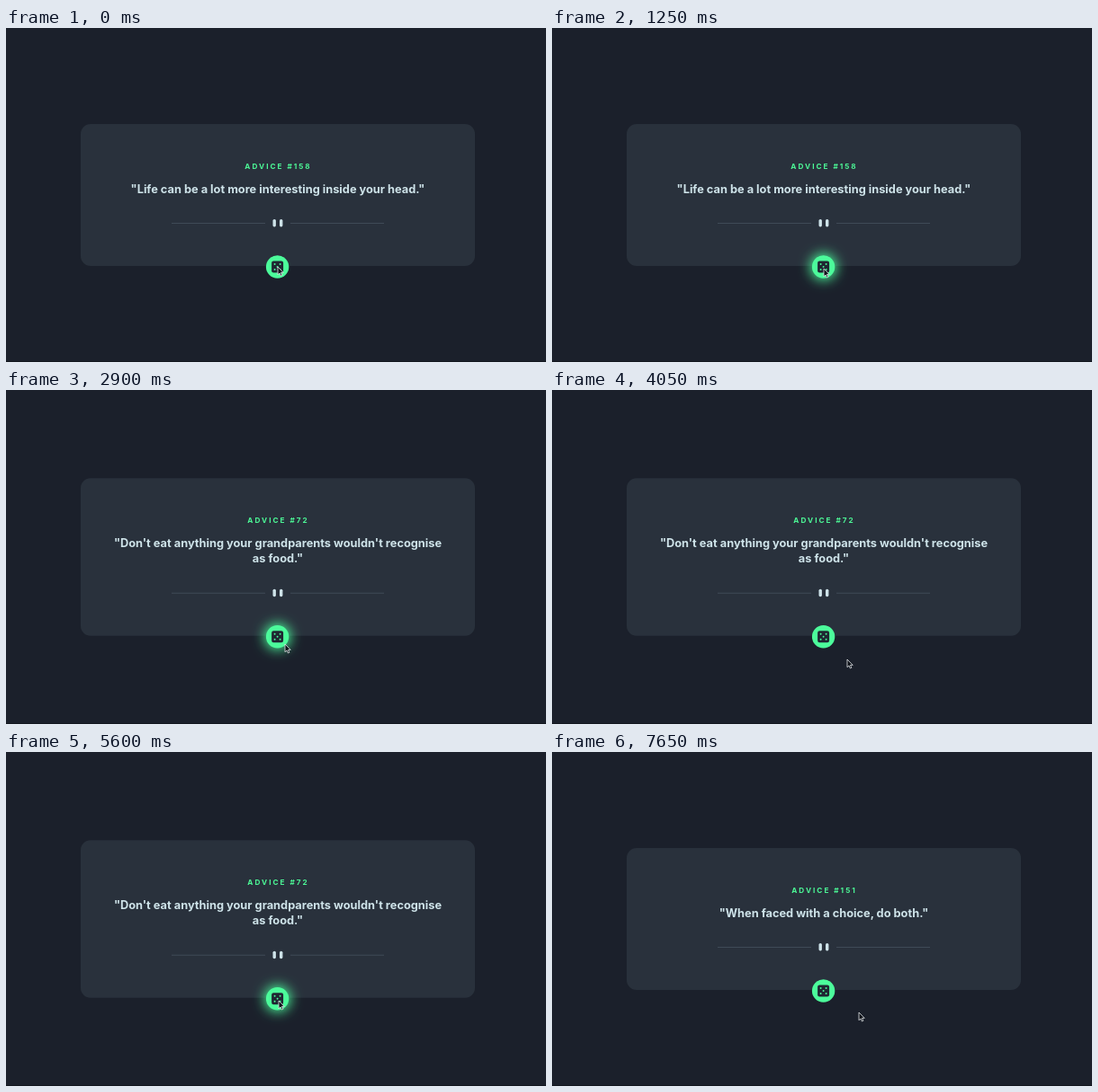
An HTML page for the animation above (8 s loop, 600 by 372 pixels).

```html
<!DOCTYPE html>
<html lang="en">
<head>
<meta charset="utf-8">
<title>Advice card</title>
<style>
  html, body { margin: 0; width: 100%; height: 100%; overflow: hidden; background: #1b202b; }
  svg { display: block; width: 600px; height: 372px; }
  text { font-family: Inter, "Open Sans", sans-serif; font-weight: 700; text-anchor: middle; }
  #heading { font-size: 8.2px; letter-spacing: 2px; fill: #4cf896; }
  .quote { font-size: 12.8px; fill: #cee3e9; }
  .green { fill: #4cfb9b; }
</style>
</head>
<body>
<svg viewBox="0 0 600 372">
  <defs>
    <filter id="blur" x="-150%" y="-150%" width="400%" height="400%">
      <feGaussianBlur stdDeviation="7"/>
    </filter>
  </defs>
  <rect width="600" height="372" fill="#1b202b"/>
  <rect y="371" width="600" height="1" fill="#12161e"/>
  <rect id="card" x="83" width="438" rx="11" fill="#29313c"/>
  <text id="heading" x="302.5"/>
  <text class="quote" x="302"/>
  <text class="quote" x="302"/>
  <g id="footer">
    <path d="M184 -47.5H288M316 -47.5H420" stroke="#3f4a57"/>
    <g fill="#cee3e9">
      <rect x="296.5" y="-52" width="3.4" height="8.4" rx="1.6"/>
      <rect x="304" y="-52" width="3.4" height="8.4" rx="1.6"/>
    </g>
    <g transform="translate(301.6 1)">
      <circle id="glow" class="green" r="14.5" filter="url(#blur)"/>
      <circle class="green" r="12.7"/>
      <rect x="-6.5" y="-6.5" width="13" height="13" rx="2.2" fill="#1f2632"/>
      <g class="green">
        <circle r=".95"/>
        <circle cx="-3" cy="-3" r=".95"/>
        <circle cx="3" cy="-3" r=".95"/>
        <circle cx="-3" cy="3" r=".95"/>
        <circle cx="3" cy="3" r=".95"/>
      </g>
    </g>
  </g>
  <path id="cursor" d="M0 0V8.8L2 7 3.3 10 4.8 9.4 3.5 6.4H6.2Z" fill="#10131a" stroke="#e4e8ea" stroke-width=".8" stroke-linejoin="round"/>
</svg>
<script>
const LOOP = 8000, LINE = 17.5, CENTER = 186;
const $ = id => document.getElementById(id);
const quoteLines = document.querySelectorAll('.quote');

const slides = [
  { from: 0, number: 158, lines: ['"Life can be a lot more interesting inside your head."'] },
  { from: 2350, number: 72, lines: ['"Don\'t eat anything your grandparents wouldn\'t recognise', 'as food."'] },
  { from: 5750, number: 151, lines: ['"When faced with a choice, do both."'] }
];

// Pointer stops: time, x, y
const stops = [
  [0, 302, 266], [400, 302, 267], [700, 312.5, 276], [900, 313, 276.5],
  [1250, 302, 268], [2700, 302, 268], [2900, 310, 283], [3350, 344, 307.5],
  [3850, 344, 307.5], [4050, 328, 300], [4650, 303, 277], [6500, 303, 277],
  [6650, 306, 277], [7350, 306, 277], [7650, 341, 290], [LOOP, 341, 290]
];

const hovers = [[50, 500], [1020, 2920], [4500, 7400]];
const FADE = 180;

const clamp = v => Math.max(0, Math.min(1, v));
const smooth = v => v * v * (3 - 2 * v);

function pointerAt(t) {
  const i = stops.findIndex(s => s[0] > t);
  const [t0, x0, y0] = stops[i - 1], [t1, x1, y1] = stops[i];
  const k = smooth((t - t0) / (t1 - t0));
  return [x0 + (x1 - x0) * k, y0 + (y1 - y0) * k];
}

const glowAt = t => Math.max(...hovers.map(([on, off]) =>
  Math.min(clamp((t - on) / FADE), 1 - clamp((t - off) / FADE))));

let shown;
function showSlide(slide) {
  if (slide === shown) return;
  shown = slide;
  const height = 140.5 + LINE * slide.lines.length;
  const top = CENTER - height / 2;
  $('card').setAttribute('y', top);
  $('card').setAttribute('height', height);
  $('heading').textContent = 'ADVICE #' + slide.number;
  $('heading').setAttribute('y', top + 49.5);
  quoteLines.forEach((line, i) => {
    line.textContent = slide.lines[i] || '';
    line.setAttribute('y', top + 76.5 + LINE * i);
  });
  $('footer').setAttribute('transform', `translate(0 ${top + height})`);
}

function draw(now) {
  const t = now % LOOP;
  showSlide(slides.findLast(s => s.from <= t));
  $('glow').setAttribute('opacity', glowAt(t));
  $('cursor').setAttribute('transform', `translate(${pointerAt(t)})`);
  requestAnimationFrame(draw);
}
draw(0);
</script>
</body>
</html>
```
